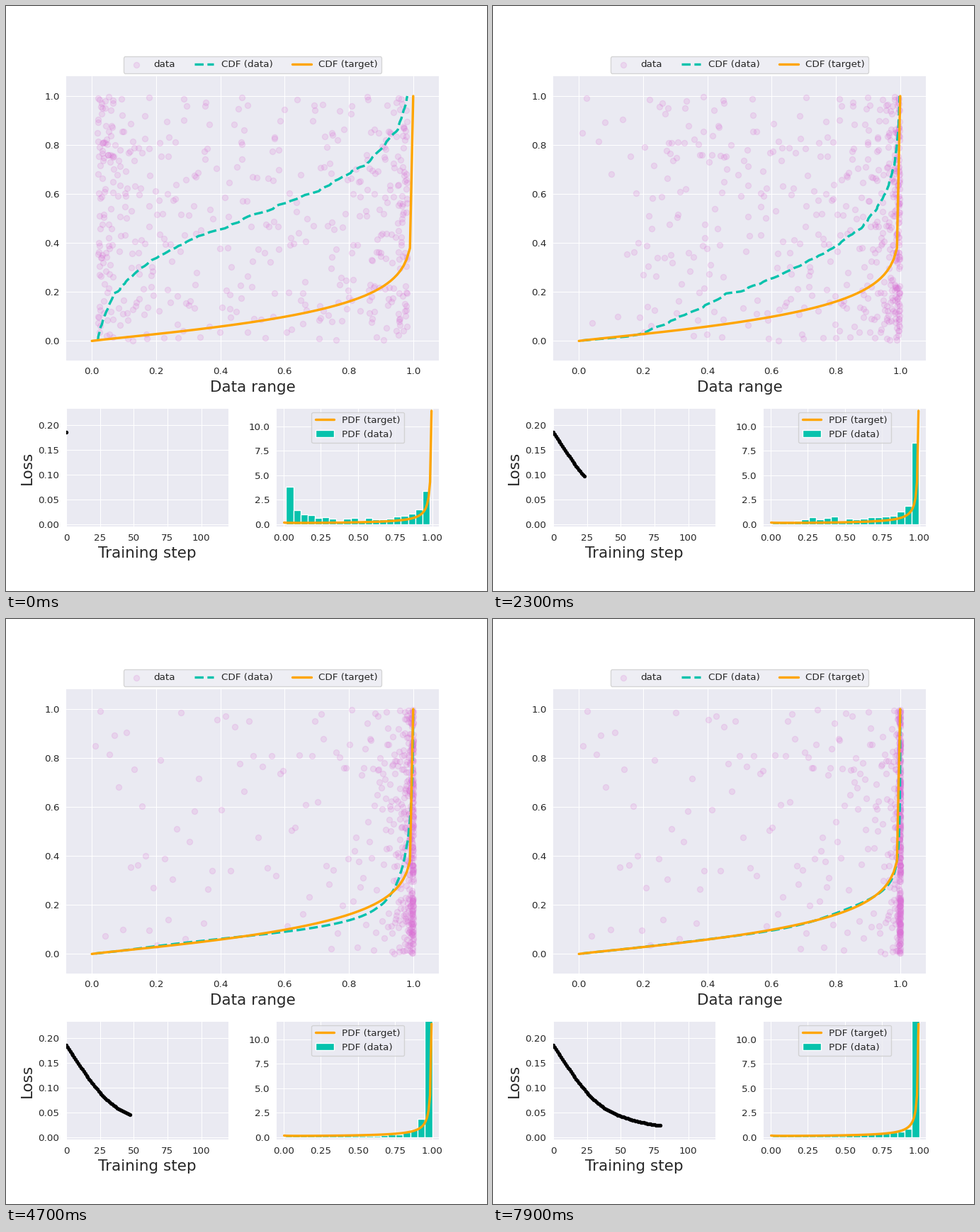
These frames come from a looping animation (679x825 px, 8 s). A matplotlib script:

```python
import numpy as np
import matplotlib.pyplot as plt
from matplotlib.animation import FuncAnimation

W, H, DPI = 679, 825, 97
FRAMES, N, BINS = 80, 500, 20
TEAL, ORANGE, PANEL = "#06c2ac", "orange", "#eaeaf2"

plt.rcParams.update({
    "font.family": "DejaVu Sans", "font.size": 10,
    "text.color": ".15", "axes.labelcolor": ".15",
    "xtick.color": ".15", "ytick.color": ".15",
    "axes.facecolor": PANEL, "axes.edgecolor": "white", "axes.linewidth": 0,
    "axes.grid": True, "axes.axisbelow": True, "axes.labelsize": 16,
    "grid.color": "white", "grid.linewidth": 0.8,
    "xtick.major.size": 0, "ytick.major.size": 0,
    "xtick.major.pad": 7, "ytick.major.pad": 7,
    "lines.solid_capstyle": "round",
    "legend.borderaxespad": 0.35, "legend.edgecolor": ".8",
})

# Target: Beta(0.9, 0.1). Functions take y = 1 - x, which keeps precision near x = 1.
NORM = np.sin(.1 * np.pi) / np.pi
EDGES = np.linspace(0, 1, 20001)
MID = (EDGES[1:] + EDGES[:-1]) / 2
TAIL = np.concatenate([[0], np.cumsum((1 - MID ** 10) ** -.1)])
TAIL /= TAIL[-1]


def beta_pdf(y):
    return NORM * (1 - y) ** -.1 * y ** -.9


def beta_cdf(y):
    """Integral over v = y ** 0.1, where the density is smooth."""
    return 1 - np.interp(y ** .1, EDGES, TAIL)


def train(z, steps, lr=.1, b1=.9, b2=.999):
    """Adam on the logits z, minimising mean (empirical CDF - target CDF)^2."""
    m, v = np.zeros(N), np.zeros(N)
    states, losses = [], []
    for k in range(1, steps + 1):
        x, y = 1 / (1 + np.exp(-z)), 1 / (1 + np.exp(z))
        rank = (np.argsort(np.argsort(z)) + 1) / N
        gap = beta_cdf(y) - rank
        states.append(x)
        losses.append(np.mean(gap ** 2))
        grad = 2 / N * gap * beta_pdf(y) * x * y
        m = b1 * m + (1 - b1) * grad
        v = b2 * v + (1 - b2) * grad ** 2
        z = z - lr * (m / (1 - b1 ** k)) / (np.sqrt(v / (1 - b2 ** k)) + 1e-8)
    return states, losses


# Logits start almost uniform on [-4, 4], evenly filled in 20 strata
rng = np.random.default_rng(4)
u = (np.arange(N) % 20 + rng.random(N)) / 20
states, losses = train(8 * u - 4 - .1 * np.sin(np.pi * u), FRAMES)
dot_y = rng.random(N)
ranks = np.arange(1, N + 1) / N


def panel(left, top, right, bottom, xlim, ylim, xticks, yticks):
    ax = fig.add_axes([left / W, 1 - bottom / H, (right - left) / W, (bottom - top) / H])
    ax.set(xlim=xlim, ylim=ylim, xticks=xticks, yticks=yticks)
    return ax


fig = plt.figure(figsize=(W / DPI, H / DPI), dpi=DPI, facecolor="white")
fifths = np.arange(6) / 5

main = panel(84.9, 99.4, 611.1, 500, (-.08, 1.08), (-.08, 1.08), fifths, fifths)
main.set_xlabel("Data range")
dots = main.scatter(states[0], dot_y, s=36, color="orchid", alpha=.18,
                    linewidths=.9, label="data")
cdf_line, = main.plot([], [], "--", color=TEAL, lw=2.5, label="CDF (data)")
grid = np.linspace(0, 1, 101)
main.plot(grid, beta_cdf(1 - grid), color=ORANGE, lw=2.5, label="CDF (target)")
main.legend(loc="lower center", bbox_to_anchor=(.5, 1), ncol=3)

loss_ax = panel(84.9, 568, 313.7, 734.25, (0, 120), (-.005, .2335),
                np.arange(0, 101, 25), np.arange(5) * .05)
loss_ax.set_xlabel("Training step")
loss_ax.set_ylabel("Loss")
loss_dots, = loss_ax.plot([], [], "o", color="black", ms=4, mew=0)

pdf_ax = panel(382.3, 568, 611.1, 734.25, (-.0445, 1.0445), (-.25, 11.8),
               np.arange(5) / 4, np.arange(5) * 2.5)
grid = np.linspace(.005, .995, 100)
pdf_ax.plot(grid, beta_pdf(1 - grid), color=ORANGE, lw=2.5, label="PDF (target)")
bars = pdf_ax.bar(np.arange(BINS) / BINS, np.ones(BINS), 1 / BINS, align="edge",
                  color=TEAL, edgecolor="white", lw=1, label="PDF (data)")
pdf_ax.legend(loc="upper center")

picks = np.linspace(0, N - 1, 125).astype(int)


def update(i):
    x = states[i]
    dots.set_offsets(np.column_stack([x, dot_y]))
    cdf_line.set_data(np.sort(x)[picks], ranks[picks])
    loss_dots.set_data(np.arange(i + 1), losses[:i + 1])
    heights, edges = np.histogram(x, BINS, density=True)
    for bar, h, left in zip(bars, heights, edges):
        bar.set(x=left, width=edges[1] - edges[0], height=h)
    return [dots, cdf_line, loss_dots, *bars]


anim = FuncAnimation(fig, update, frames=FRAMES, interval=100,
                     repeat=True, repeat_delay=0)
plt.show()
```
